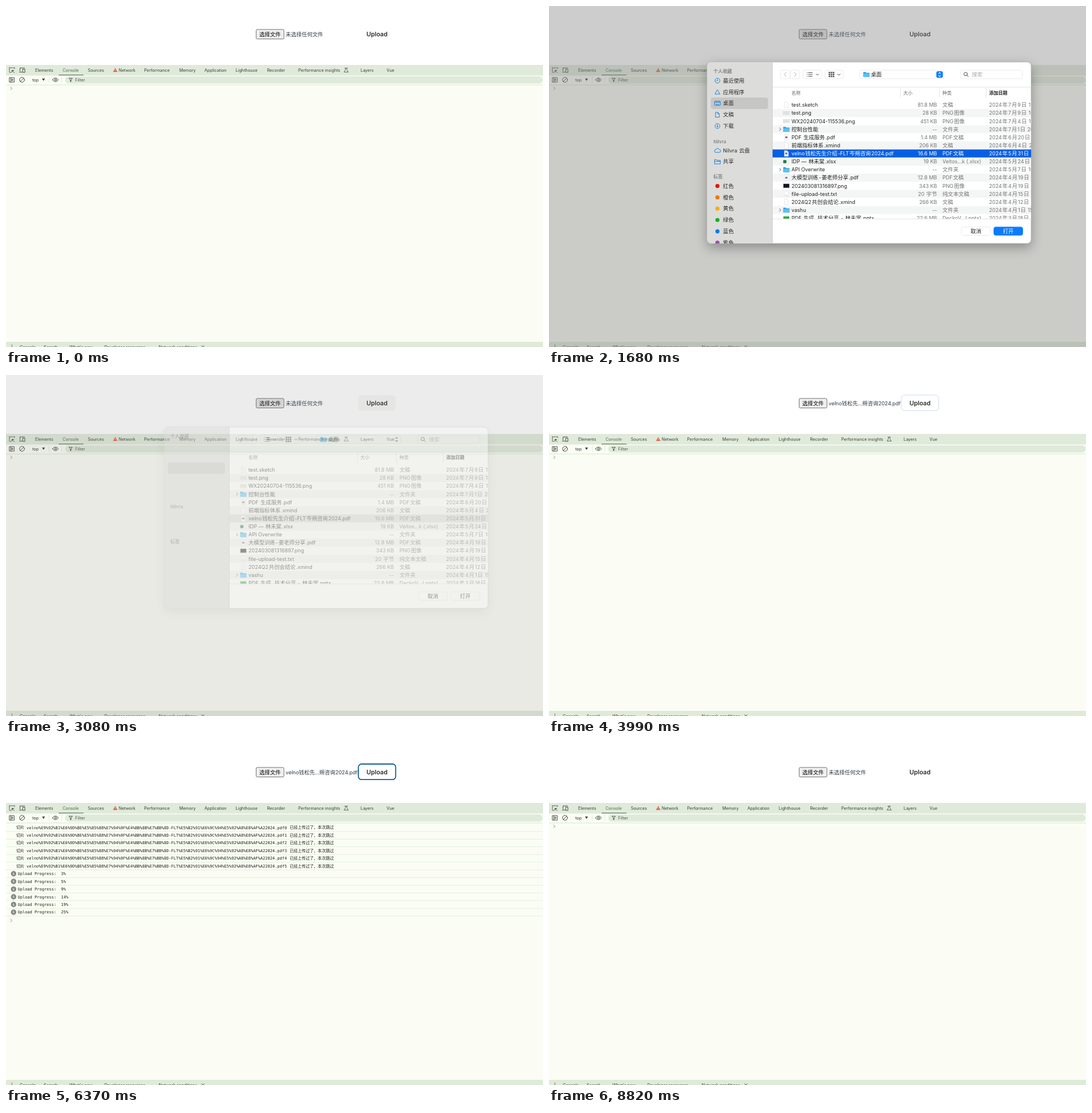
Recreate the animation shown at these times as an HTML page. Size 939 by 596 pixels, loop 9030 ms.

```html
<!DOCTYPE html>
<html lang="zh">
<head>
<meta charset="utf-8">
<title>File upload</title>
<style>
html, body { margin: 0; width: 100%; height: 100%; overflow: hidden; background: #fff; }
svg { display: block; width: 939px; height: 596px; }
text { white-space: pre; font-family: Inter, "Noto Sans CJK SC", "Noto Sans CJK", sans-serif; }
.mono text { font-family: "DejaVu Sans Mono", "Noto Sans CJK SC", "Noto Sans CJK", monospace; }
.line { fill: none; stroke: #454a42; stroke-linecap: round; stroke-linejoin: round; }
.thin { stroke: #e3e3e3; }
.control { fill: #fff; stroke: #e4e4e4; stroke-width: .8; }
.blue { fill: none; stroke: #0878d8; stroke-width: .9; stroke-linejoin: round; }
#sheet { filter: drop-shadow(0 7px 10px rgba(0, 0, 0, calc(.31 * var(--depth)))); }
.sel rect { fill: none; }
.picked .sel .bar { fill: #0660e4; }
.picked .sel text { fill: #fff; }
.closing .sel .bar { fill: #d8d9d8; }
#open text { fill: #b4b4b4; }
.picked #open rect { fill: #0a7aff; stroke: #0a7aff; }
.picked #open text { fill: #fff; }
.closing #open text { fill: #222; }
.closing #popup rect { fill: none; }
.closing #popup path { stroke: #333; }
</style>
</head>
<body>
<svg id="stage" viewBox="0 0 939 596" xmlns="http://www.w3.org/2000/svg"></svg>
<script>
const LOOP = 9030, STEP = 70, ROW = 13.45;
const FILE = 'velno钱松先生介绍-FLT岑朔咨询2024.pdf';
const PROGRESS = [3, 5, 9, 14, 19, 25, 30, 36, 41, 47, 52, 58];
const PROGRESS_AT = [4620, 5040, 5320, 5670, 6020, 6370, 6790, 7070, 7420, 7770, 8120, 8540];

// Text centred on y; CJK runs are slightly larger than Latin ones and set off by a small gap.
const t = (x, y, size, s, attr = '', gap = .9) => {
  const runs = s.match(/[\u3000-\uffff]+|[^\u3000-\uffff]+/g).map((run, i) =>
    `<tspan dx="${i ? gap : 0}" font-size="${run > '\u3000' ? size * 1.04 : size}">${run}</tspan>`);
  return `<text x="${x}" y="${y + size * .36}" font-size="${size}" ${attr}>${runs.join('')}</text>`;
};
const r = (x, y, w, h, attr = '') => `<rect x="${x}" y="${y}" width="${w}" height="${h}" ${attr}/>`;
const p = (d, attr = 'class="line"') => `<path d="${d}" ${attr}/>`;
const c = (x, y, radius, attr) => `<circle cx="${x}" cy="${y}" r="${radius}" ${attr}/>`;
const list = (items, draw) => items.map(draw).join('');
const MIDDLE = 'text-anchor="middle"';

const tabs = [[51, 'Elements'], [99, 'Console'], [143, 'Sources'], [197, 'Network'], [241.5, 'Performance'],
  [303, 'Memory'], [347, 'Application'], [401.5, 'Lighthouse'], [456.5, 'Recorder'],
  [511, 'Performance insights'], [620, 'Layers'], [665.5, 'Vue']];
const drawer = [[24, 'Console'], [66, 'Search'], [111, "What's new"], [172, 'Developer resources'],
  [267, 'Network conditions']];

const page = `
  ${r(0, 0, 939, 596, 'fill="#fff"')}
  ${r(437.4, 41, 48.6, 16.6, 'id="choose" rx="2" stroke="#707070"')}
  ${t(461.7, 49.3, 9, '选择文件', MIDDLE)}
  <g id="label" fill="#303a44">${t(489, 49.3, 9, '未选择任何文件')}
  ${t(489, 49.3, 9, FILE.slice(0, 8) + '…' + FILE.slice(-11), '', 0)}</g>
  ${r(616.2, 35, 65.2, 27.2, 'id="upload" rx="5.5"')}
  ${t(648.7, 49, 10.8, 'Upload', MIDDLE + ' font-weight="500" fill="#0f0f0f"')}`;

const devtools = `
  ${r(0, 103, 939, 493, 'fill="#fbfdf4"')}
  ${r(0, 103, 939, 18.5, 'fill="#e0eadb"')}
  <g fill="#3a4038">${list(tabs, ([x, s]) => t(x, 112, 7.3, s, s === 'Console' ? 'fill="#4d6b4a"' : ''))}</g>
  ${r(92, 120, 43.5, 1.2, 'fill="#55794f"')}
  ${p('M191 108.3l3.9 7h-7.8z', 'fill="#e2623a"')}
  ${p('M191 110.8v2.2', 'stroke="#fff" stroke-width=".8"')}
  ${p('M6 108h9M6 108v8h3M15 108v2', 'class="line" stroke-dasharray="1.2 1.2"')}
  ${p('M14.5 116.5l-4-4m0 3.2v-3.2h3.2')}
  ${p('M24.5 113.5v-5.2h8M23.5 115.5h4.5M29.5 110.5h3.6v5.5h-3.6z')}
  ${p('M592.5 108.5h4.5M593.7 108.5v2.6l-2.6 4.4h7.4l-2.6-4.4v-2.6', 'class="line" stroke-width=".8"')}
  ${r(6.2, 125.2, 8.2, 7.8, 'class="line"')}
  ${p('M8.4 125.5v7.5M10.6 127.4l2.2 1.7-2.2 1.7z')}
  ${c(28, 129, 4.3, 'class="line"')}${p('M25 132l6-6')}
  ${t(46, 129, 7.3, 'top', 'fill="#30352e"')}${p('M63 126.7h5.2l-2.6 4.2z', 'fill="#3a4038"')}
  ${p('M75.5 124v10M97.5 124v10', 'stroke="#dfe8da"')}
  ${p('M81.3 129q5.2-6.6 10.4 0q-5.2 6.6-10.4 0z')}${c(86.5, 129, 1.6, 'class="line"')}
  ${r(103.5, 123, 835, 12.6, 'rx="6.3" fill="#e0eadc"')}
  ${p('M110.3 126.3h5.8l-2.2 2.9v2.9h-1.4v-2.9z', 'class="line" stroke-width=".9"')}
  ${t(121, 129, 7.3, 'Filter', 'fill="#50564d"')}
  ${p('M0 138h939', 'stroke="#d2eccf"')}
  <g id="log" class="mono">${list([...Array(18).keys()], i => {
    const y = 146 + i * ROW;
    const body = i < 6
      ? t(18, y, 6.75, '切片') + t(36, y, 7, encodeURIComponent(FILE) + i) + t(496, y, 6.75, '已经上传过了，本次跳过')
      : c(13.3, y, 4.7, 'fill="#83857f"') + t(13.3, y, 6, '6', MIDDLE + ' fill="#fff"') +
        t(20.5, y, 7, `Upload Progress:  ${PROGRESS[i - 6]}%`);
    return `<g fill="#1d1f1c">${body}${p(`M0 ${y + 6.8}h939`, 'stroke="#dff2d9"')}</g>`;
  })}</g>
  ${p('M-1.3-2.5l2.8 2.5-2.8 2.5', 'id="prompt" class="line" style="stroke:#8d938a"')}
  ${r(0, 587, 939, 9, 'fill="#dfead9"')}
  ${list([592.7, 595.5], y => c(10.3, y, .8, 'fill="#3a4038"'))}
  <g fill="#3a4038">${list(drawer, ([x, s]) => t(x, 596, 7.3, s))}</g>
  ${p('M342 593.8l4.4 4.4M346.4 593.8l-4.4 4.4')}`;

const places = [
  [130.5, '最近使用', c(294.5, 130.5, 4.3, 'class="blue"') + p('M294.5 127.8v2.9h-2', 'class="blue"')],
  [150.3, '应用程序', p('M294.5 146.3l4.4 7.6h-8.8z', 'class="blue"')],
  [170.2, '桌面', r(289.5, 166.4, 10, 7.4, 'rx="1" class="blue"') + p('M290 168.2h9M291.5 172h6', 'class="blue"')],
  [190, '文稿', p('M291.2 185.8h4l2.6 2.6v6h-6.6zM295 186v2.6h2.6', 'class="blue"')],
  [209.8, '下载', c(294.5, 209.8, 4.3, 'class="blue"') + p('M294.5 207.2v4.6m-1.9-1.9l1.9 1.9 1.9-1.9', 'class="blue"')],
  [252.3, 'Nilvra 云盘', p('M291.6 255.8a2.3 2.3 0 0 1 0-4.6a3.2 3.2 0 0 1 6-.4a2.5 2.5 0 0 1 .2 5z', 'class="blue"')],
  [272.1, '共享', p('M289.5 276v-7.4h3.4l1 1.3h5.6v6.1zM289.5 271.6h10', 'class="blue"')]];
const tags = [['红色', '#e8140c'], ['橙色', '#f0780a'], ['黄色', '#f8ae08'], ['绿色', '#12b41e'],
  ['蓝色', '#0a78f0'], ['紫色', '#9450b0']];

const files = `test.sketch|81.8 MB|文稿|7月9日 19|page
test.png|28 KB|PNG图像|7月9日 16|image
WX20240704-115536.png|451 KB|PNG图像|7月4日 11|image
控制台性能|--|文件夹|7月1日 20|folder
PDF 生成服务.pdf|1.4 MB|PDF文稿|6月20日 15|pdf
前端指标体系.xmind|206 KB|文稿|6月4日 21|page
${FILE}|16.6 MB|PDF文稿|5月31日 14|pdf
IDP — 林未棠.xlsx|19 KB|Veltos…k (.xlsx)|5月24日 10|table
API Overwrite|--|文件夹|5月7日 16|folder
大模型训练-姜老师分享.pdf|12.8 MB|PDF文稿|4月19日 14|pdf
202403081316897.png|343 KB|PNG图像|4月19日 11|dark
file-upload-test.txt|20 字节|纯文本文稿|4月15日 17|text
2024Q2共创会结论.xmind|266 KB|文稿|4月12日 18|page
vashu|--|文件夹|4月1日 15|folder
PDF 生成_技术分享 - 林未棠.pptx|22.6 MB|DeckoV…(.pptx)|3月18日 10|slides`.split('\n').map(s => s.split('|'));

const folder = (x, y) => p(`M${x - 5.4} ${y + 4.4}v-8.6h4l1.2 1.3h5.6v7.3z`, 'fill="#2f9fe0"') +
  r(x - 5.4, y - 1.6, 10.8, 6.2, 'rx=".8" fill="#5cc0f5"');
const sheet = y => p(`M411.6 ${y - 5}h4.6l2.4 2.4v7.6h-7z`, 'fill="#fcfcfc" stroke="#dcdcdc" stroke-width=".6"');
const icons = {
  page: sheet,
  pdf: y => sheet(y) + r(413, y - 1.5, 4, 3, 'style="fill:#6d7f92"'),
  text: y => sheet(y) + p(`M413 ${y + 2.5}h4`, 'stroke="#aaa" stroke-width=".7"'),
  image: y => r(409.8, y - 2.8, 10.4, 5.6, 'fill="#eee" stroke="#c4c4c4" stroke-width=".6"') +
    p(`M411 ${y}h8`, 'stroke="#b5b5b5" stroke-width=".8"'),
  folder: y => p(`M403 ${y - 2.4}l2.4 2.4-2.4 2.4`, 'class="line" stroke-width=".9"') + folder(415, y),
  table: y => sheet(y) + r(409.6, y - 2.6, 5.6, 5.4, 'fill="#1f7a48"'),
  dark: y => r(409.8, y - 3.6, 10.4, 7.2, 'fill="#15181c" stroke="#ccc" stroke-width=".5"'),
  slides: y => r(409.8, y - 3.2, 10.4, 7, 'fill="#36a845"')
};

const fileRow = ([name, size, kind, date, icon], i) => {
  const y = 173 + i * 14.13;
  return `<g class="${i === 6 ? 'sel' : ''}" fill="#747474">
    ${r(391, y - 7.06, 452, 14.13, `class="bar" fill="${i % 2 ? '#f4f5f5' : '#fff'}"`)}
    ${icons[icon](y)}${t(424, y, 9, name, 'fill="#222"')}
    ${t(678.5, y, 9, size, 'text-anchor="end"')}${t(688, y, 9, kind)}${t(769.5, y, 9, `2024年${date}:20`)}</g>`;
};
const down = x => p(`M${x - 2.2} 118.8l2.2 2.2 2.2-2.2`);
const heading = (y, s) => t(287.5, y, 7.8, s, 'font-weight="600" fill="#858585"');

const dialog = `
  <clipPath id="frame">${r(276.5, 98, 566.5, 317, 'rx="7"')}</clipPath>
  <clipPath id="listArea">${r(390, 142, 453, 230)}</clipPath>
  ${r(276.5, 98, 566.5, 317, 'id="sheet" rx="7" fill="#fff" stroke="#aaa" stroke-width=".6"')}
  <g clip-path="url(#frame)">
    ${r(276, 98, 114.5, 318, 'fill="#dcdcda"')}
    ${p('M390.5 98v318', 'stroke="#cbcbca"')}
    ${r(283, 160, 100, 20, 'rx="4" fill="#c6c6c5"')}
    ${heading(114, '个人收藏')}${heading(237, 'Nilvra')}${heading(298, '标签')}
    <g id="places" fill="#2b2b2b">
      ${list(places, ([y, s, icon]) => icon + t(304.3, y, 9, s))}
      ${list(tags, ([s, color], i) => c(294.5, 314.6 + i * 19.8, 3.6, `fill="${color}"`) + t(304.3, 314.6 + i * 19.8, 9, s))}
    </g>
    ${list([[404.5, 17], [422, 16.5], [444, 33], [482.5, 32.5], [543.5, 147], [720, 108]],
      ([x, w]) => r(x, 112.2, w, 15, 'rx="3.5" class="control"'))}
    ${p('M414.5 116l-3 3.7 3 3.7M429.2 116l3 3.7-3 3.7', 'class="line" style="stroke:#b0b0b0"')}
    ${p('M451.3 116.5h.3m2 0h6.8M451.3 119.7h.3m2 0h6.8M451.3 122.9h.3m2 0h6.8')}${down(469.3)}
    ${list([0, 1, 2, 3, 4, 5, 6, 7, 8], i => r(489 + i % 3 * 3.6, 115 + (i / 3 | 0) * 3.4, 2.7, 2.5, 'fill="#555"'))}${down(507)}
    ${folder(555, 119.7)}${t(563, 119.7, 9, '桌面', 'fill="#222" font-weight="500"')}
    <g id="popup">${r(677.3, 114, 11.4, 11.4, 'rx="3" fill="#0a7aff"')}
      ${p('M681 118.3l2-2 2 2M681 121.2l2 2 2-2', 'fill="none" stroke="#fff" stroke-width="1.1"')}</g>
    ${c(728.6, 118.9, 3, 'class="line"')}${p('M730.9 121.3l2.4 2.4')}${t(739.3, 119.7, 9, '搜索', 'fill="#adadad"')}
    ${p('M391 141.8h452M614.5 142v18.5M682.8 142v18.5M764.5 142v18.5', 'class="thin"')}
    <g fill="#666">${list([[424, '名称'], [619.5, '大小'], [688, '种类']], ([x, s]) => t(x, 151.8, 7.7, s))}</g>
    ${t(769.5, 151.8, 7.7, '添加日期', 'font-weight="700" fill="#222"')}
    <g clip-path="url(#listArea)">${list(files, fileRow)}</g>
    ${p('M391 372.2h452', 'class="thin"')}
    ${r(721, 386.2, 51, 14.6, 'rx="3.5" class="control"')}${t(746.5, 393.5, 9, '取消', MIDDLE + ' fill="#222" font-weight="500"')}
    <g id="open">${r(777.8, 386.2, 50.6, 14.6, 'rx="3.5" class="control"')}${t(803, 393.5, 9, '打开', MIDDLE + ' font-weight="500"')}</g>
  </g>`;

const $ = id => document.getElementById(id);
$('stage').innerHTML = page + devtools + r(0, 0, 939, 596, 'id="dim" fill="#828282"') + `<g id="dialog">${dialog}</g>`;

const clamp = v => Math.min(1, Math.max(0, v));
const show = (el, on) => el.style.display = on ? '' : 'none';
const within = (time, a, b) => time >= a && time < b;

function drawDialog(time) {
  const el = $('dialog'), visible = within(time, 350, 3220), closing = time >= 2800;
  show(el, visible);
  show($('dim'), visible);
  if (!visible) return;
  const left = (1 - clamp((time - 280) / 420)) ** 2;
  const out = clamp((time - 2800) / 420);
  const depth = (1 - left) * (1 - out ** 1.2);
  el.setAttribute('class', closing ? 'closing' : time >= 1680 ? 'picked' : '');
  el.setAttribute('transform', `translate(0 ${-28 * left - 13 * out ** 1.5})`);
  el.setAttribute('opacity', Math.min(1, 2.2 * (1 - left)) * (1 - out ** 1.3));
  el.style.setProperty('--depth', depth);
  $('places').setAttribute('opacity', clamp(1 - 1.9 * out));
  $('dim').setAttribute('opacity', .4 * depth);
}

function drawUpload(time) {
  const focused = within(time, 4340, 8750), hover = clamp((time - 3920) / 280);
  const el = $('upload');
  el.setAttribute('fill', within(time, 2800, 3220) ? '#f7f8f5' : '#fff');
  el.setAttribute('stroke', focused ? '#135c92' : '#396cd8');
  el.setAttribute('stroke-width', focused ? 1.8 : 1);
  el.setAttribute('stroke-opacity', focused ? 1 : time < 8750 ? hover : 0);
}

function draw(time) {
  const chosen = within(time, 3220, 8750);
  $('choose').setAttribute('fill', within(time, 70, 3220) ? '#e3e3e3' : '#efefef');
  [...$('label').children].forEach((el, i) => show(el, chosen === (i === 1)));
  drawUpload(time);
  const count = within(time, 4550, 8750) ? 6 + PROGRESS_AT.filter(at => at <= time).length : 0;
  [...$('log').children].forEach((el, i) => show(el, i < count));
  $('prompt').setAttribute('transform', `translate(9.3 ${count ? 147 + count * ROW : 144})`);
  drawDialog(time);
}

const start = performance.now();
function tick() {
  const time = (performance.now() - start) % LOOP;
  draw(Math.floor(time / STEP) * STEP);
  requestAnimationFrame(tick);
}
tick();
</script>
</body>
</html>
```
